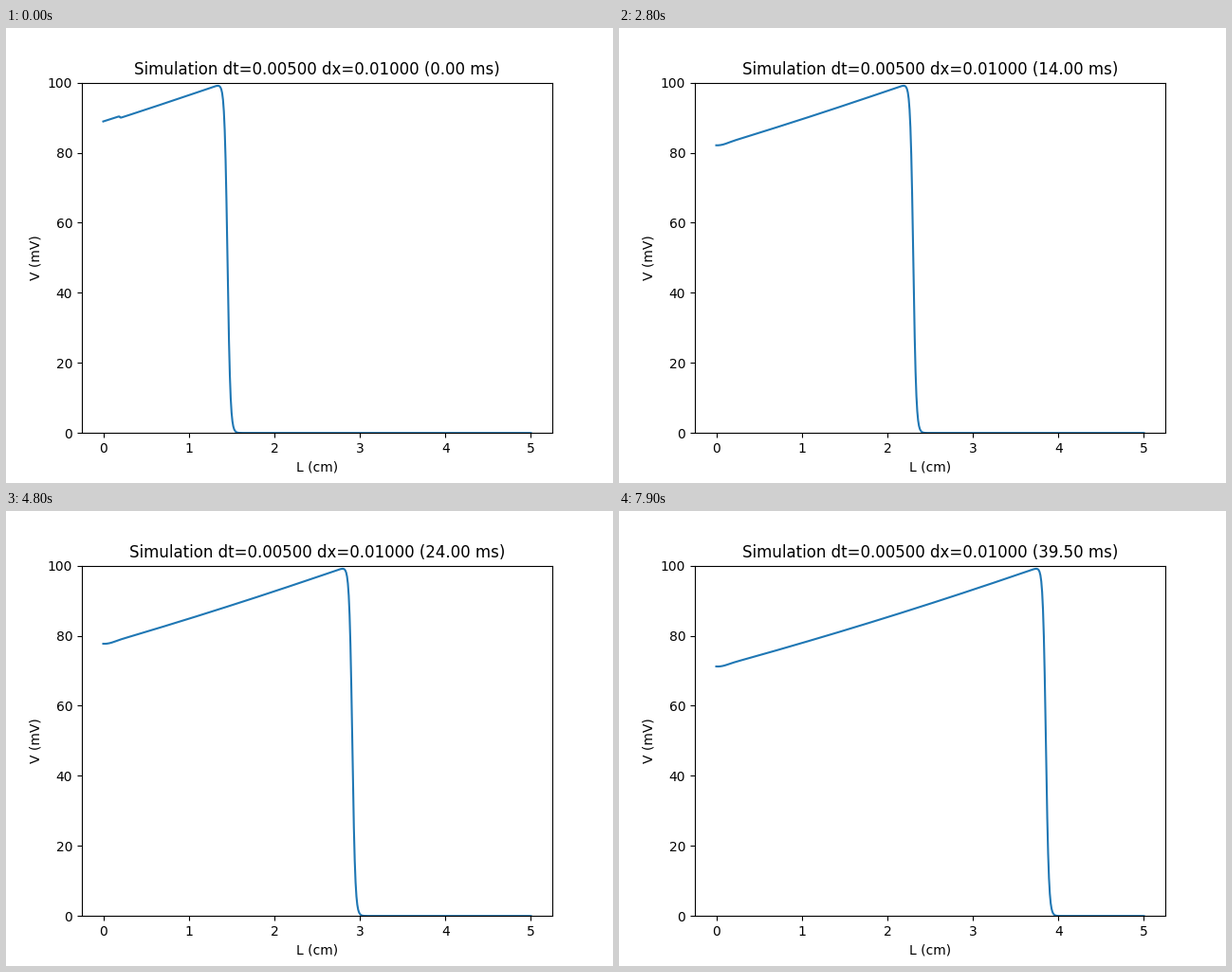
Animation of 640 by 480 pixels, one loop 8 s. Source, as a matplotlib script:

```python
import numpy as np
import matplotlib.pyplot as plt
from matplotlib.animation import FuncAnimation

FRAMES = 80
INTERVAL = 100      # ms of playback per frame
STEP = 0.5          # simulated ms per frame
DT, DX = 0.005, 0.01
LENGTH = 5.0        # cm

START, SPEED = 1.452, 0.0608    # wave front, cm and cm/ms
STEEPNESS = 58.0                # 1/cm
STIM_END, STIM_DECAY = 0.2, 0.8

x = np.linspace(0, LENGTH, round(LENGTH / DX) + 1)


def potential(t):
    """Membrane potential along the cable at time t (ms)."""
    s = START + SPEED * t - x
    behind = np.maximum(s, 0)
    plateau = 100.2 - 8.5 * behind + 0.24 * behind**2
    front = 0.5 * (1 + np.tanh(0.5 * STEEPNESS * s))

    # Stimulus step fades out while the sealed end levels the curve
    fade = np.exp(-t / STIM_DECAY)
    width = 0.006 + np.sqrt(0.004 * t)
    stim = 0.275 * (1 - np.tanh((x - STIM_END + 0.005) / width))
    end = 0.3 * np.exp(-x / 0.04) - 0.2 * np.exp(-((x - 0.08) / 0.09) ** 2)
    return front * (plateau + fade * stim + (1 - fade) * end)


fig, ax = plt.subplots(figsize=(6.4, 4.8), dpi=100)
line, = ax.plot(x, potential(0))
ax.set_xlim(-0.25, 5.25)
ax.set_ylim(0, 100)
ax.set_xlabel("L (cm)")
ax.set_ylabel("V (mV)")
title = ax.set_title("")


def update(i):
    t = i * STEP
    line.set_ydata(potential(t))
    title.set_text(f"Simulation dt={DT:.5f} dx={DX:.5f} ({t:.2f} ms)")
    return line, title


anim = FuncAnimation(fig, update, frames=FRAMES, interval=INTERVAL,
                     init_func=lambda: update(0), repeat=True, repeat_delay=0)
plt.show()
```
